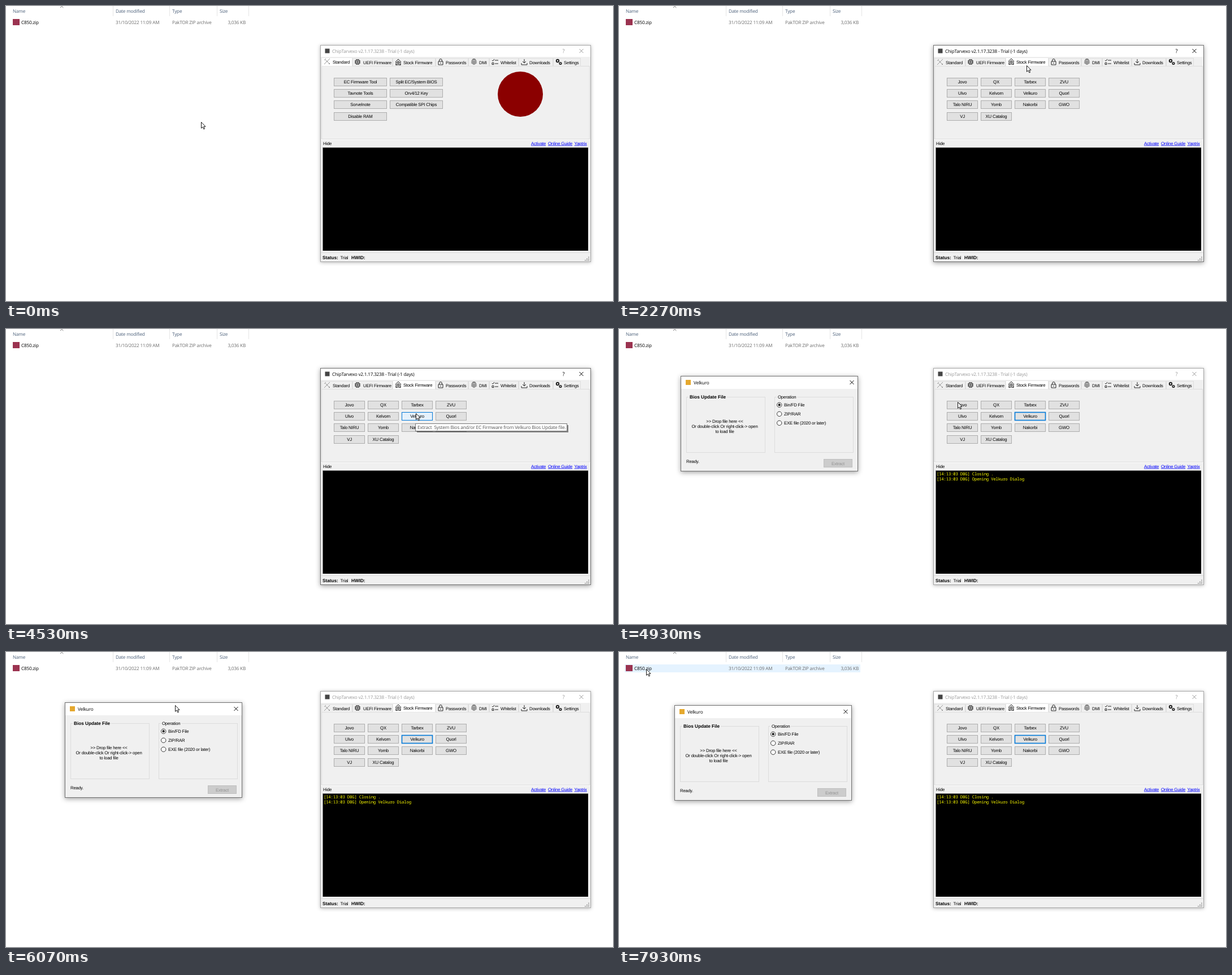
An HTML page that plays this animation: 1074x522 px, repeating every 8 s.

```html
<!DOCTYPE html>
<html lang="en">
<head>
<meta charset="utf-8">
<title>Firmware tool</title>
<style>
html, body { margin: 0; width: 100%; height: 100%; overflow: hidden; background: #fff; }
svg { display: block; width: 1074px; height: 522px; }
text { font: 7.8px "Liberation Sans", Arial, sans-serif; letter-spacing: -.2px; white-space: pre; text-rendering: geometricPrecision; }
.ui { font: 8.2px "Open Sans", "Noto Sans", sans-serif; letter-spacing: -.2px; }
.tip { font-size: 8.4px; }
.bold { font-weight: bold; font-size: 8.2px; letter-spacing: 0; }
.mono { font: 7.4px "Noto Sans Mono", "DejaVu Sans Mono", monospace; letter-spacing: -.25px; }
.link { fill: #00f; text-decoration: underline; }
.icon { fill: none; stroke: #222; }
.btn { fill: #e1e1e1; stroke: #adadad; }
.hot { fill: #e5f1fb; stroke: #0078d7; }
.down { fill: #cce4f7; stroke: #005499; }
.focus { stroke: #0078d7; stroke-width: 1.6px; }
.tab { fill: #f0f0f0; stroke: #dedede; }
.tab.over { fill: #d8eaf9; }
.tab.on { fill: #fff; stroke: #e8e8e8; }
#main { filter: drop-shadow(0 1px 3px rgba(0,0,0,.28)); }
#main.active { filter: drop-shadow(0 2px 4px rgba(0,0,0,.38)); }
#main .frame { fill: #f0f0f0; stroke: #a6a6a6; }
#main.active .frame { stroke: #707070; }
#main .caption { fill: #999; stroke: none; }
#main.active .caption { fill: #000; }
#main .close { stroke: #999; }
#main.active .close { stroke: #000; }
#dialog { filter: drop-shadow(0 2px 4px rgba(0,0,0,.38)); }
</style>
</head>
<body>
<svg id="stage" viewBox="0 0 1074 522"></svg>
<script>
const BRAND = 'Velkuro';
const STEP = 1000 / 15, STEPS = 120;

const attrs = o => Object.entries(o).map(([k, v]) => `${k}="${v}"`).join(' ');
const text = (x, y, s, o = {}) => `<text x="${x}" y="${y}" ${attrs(o)}>${s}</text>`;
const ui = (x, y, s, o = {}) => text(x, y, s, { class: 'ui', ...o });
const mid = (x, y, s, o = {}) => text(x, y, s, { 'text-anchor': 'middle', ...o });
const rect = (x, y, w, h, o = {}) => `<rect x="${x}" y="${y}" width="${w}" height="${h}" ${attrs(o)}/>`;
const path = (d, o = {}) => `<path d="${d}" ${attrs({ fill: 'none', ...o })}/>`;
const cross = (x, y, o = {}) => path(`M${x - 3.5} ${y - 3.5}l7 7m0-7l-7 7`, { stroke: '#000', ...o });
const button = (x, y, w, label, id) =>
  rect(x + .5, y + .5, w - 1, 14, { class: 'btn', ...(id && { id }) }) + mid(x + w / 2, y + 10.4, label);

const rowY = [127, 147, 167, 188];

// Icons are drawn around their own centre.
const icons = [
  '<g stroke="#999"><path d="M-4-4L5 5M5-5L-5 5M-5-2l3-3M3 5l2-2"/></g>',
  '<path d="M-3-3h6v6h-6zM-1-1h2v2h-2zM-2-5v2M0-5v2M2-5v2M-2 3v2M0 3v2M2 3v2M-5-2h2M-5 0h2M-5 2h2M3-2h2M3 0h2M3 2h2"/>',
  '<path d="M-5 0L0-5 5 0M-4 0v5h2M4 0v5h-2M-5 5h10"/><circle cy="1" r="2.3"/><circle cy="1" r=".6"/>',
  '<path d="M-4-1h8v6h-8zM-2.3-1v-2a2.3 2.3 0 0 1 4.6 0v2M0 1v2"/>',
  '<path stroke="#666" d="M-4 3v-4a4 4 0 0 1 8 0v4M-2.4 4v-5a2.4 2.4 0 0 1 4.8 0v5M-.7 5v-6a.7.7 0 0 1 1.4 0v6M-3-4.5q3-2 6 0"/>',
  '<path d="M0-3h6M0 3h6M-5-3l1.5 1.5L-1-5M-5 1.5h3v3h-3z"/>',
  '<path d="M0-5v7M-3-1L0 2 3-1M-5 2v3h10v-3"/>',
  '<circle cx="-2" cy="-2" r="2.2" stroke-width="2"/><circle cx="3" cy="2.5" r="1.8" stroke-width="1.6"/>'
];

const tabs = [
  [558, 568, 578, 'Standard'], [613, 622, 632, 'UEFI Firmware'], [684, 694, 703, 'Stock Firmware'],
  [760, 769, 778, 'Passwords'], [818, 828, 837, 'DMI'], [855, 865, 875, 'Whitelist'],
  [907, 917, 926, 'Downloads'], [968, 978, 987, 'Settings']
];
const tabStrip = tabs.map(([x, iconX, textX, label], i) => {
  const end = i < 7 ? tabs[i + 1][0] : 1017;
  return rect(x + .5, 92.5, end - x - 1, 14, { class: 'tab', id: 'tab' + i }) +
    `<g id="tabBody${i}"><g class="icon" id="icon${i}" transform="translate(${iconX} 99)">${icons[i]}</g>` +
    text(textX, 102.6, label) + '</g>';
}).join('');

const standardPage = [
  ['EC Firmware Tool', 'Tavnote Tools', 'Sorvelnote', 'Disable RAM'],
  ['Split EC/System BIOS', 'Orv4/12 Key', 'Compatible SPI Chips']
].map((col, c) => col.map((s, r) => button(580 + c * 99, rowY[r], 94, s)).join('')).join('') +
  '<circle cx="910" cy="156" r="40" fill="#8b0000"/>';

const stockPage = [
  ['Jovo', 'QX', 'Tarbex', 'ZVU'],
  ['Ulvo', 'Kelvorn', BRAND, 'Quorl'],
  ['Talo NIRU', 'Yomb', 'Nakorbi', 'GWO'],
  ['VJ', 'XU Catalog']
].map((row, r) => row.map((s, c) =>
  button(580 + c * 60, rowY[r], 55, s, s === BRAND && 'brandButton')).join('')).join('');

const explorer =
  rect(10, 22, 417, 14, { id: 'rowHover', fill: '#e5f3ff' }) +
  path('M189.5 0V18M289.5 0V18M373.5 0V18M429.5 0V18', { stroke: '#e5e5e5' }) +
  path('M96 3L98.7.5 101.4 3', { stroke: '#777' }) +
  [[12, 'Name'], [194, 'Date modified'], [294, 'Type'], [378, 'Size']]
    .map(([x, s]) => ui(x, 12, s, { fill: '#4c607a' })).join('') +
  rect(12, 23, 12, 11, { fill: '#9b3350' }) + ui(27, 32, 'C850.zip') +
  ui(194, 32, '31/10/2022 11:09 AM', { fill: '#6d6d6d' }) +
  ui(294, 32, 'PakTOR ZIP archive', { fill: '#6d6d6d' }) +
  ui(424, 32, '3,036 KB', { fill: '#6d6d6d', 'text-anchor': 'end' });

const mainWindow = `<g id="main">` +
  rect(556.5, 69.5, 478, 383, { class: 'frame' }) +
  rect(557, 70, 477, 20, { fill: '#fff' }) +
  rect(564.5, 75.5, 8, 8, { fill: '#444' }) +
  ui(577, 83, 'ChipTarvexo v2.1.17.3238 - Trial (-1 days)', { class: 'ui caption' }) +
  ui(984.5, 83, '?', { class: 'ui caption', style: 'font-size:9.5px' }) +
  cross(1018, 79.5, { class: 'close' }) +
  rect(558.5, 106.5, 474, 129, { fill: '#f0f0f0', stroke: '#dcdcdc' }) + tabStrip +
  `<g id="standardPage">${standardPage}</g><g id="stockPage">${stockPage}</g>` +
  path('M557 236.5H1034', { stroke: '#fff' }) +
  text(561, 245.6, 'Hide') +
  [[929, 'Activate'], [959, 'Online Guide'], [1005.5, 'Yaptrix']]
    .map(([x, s]) => text(x, 245.6, s, { class: 'link' })).join('') +
  rect(561, 251, 469, 182) +
  path('M560.5 433V250.5H1030', { stroke: '#828282' }) +
  path('M560 433.5H1030.5V250', { stroke: '#eee' }) +
  '<g id="log" fill="#ff0">' + text(562, 259.2, '[14:13:03 DBG] Closing .', { class: 'mono' }) +
  text(562, 268.2, `[14:13:03 DBG] Opening ${BRAND} Dialog`, { class: 'mono' }) + '</g>' +
  path('M557 436.5H1034', { stroke: '#dcdcdc' }) +
  text(560, 448, 'Status:', { class: 'bold' }) + text(591.5, 448, 'Trial') + text(611, 448, 'HWID:', { class: 'bold' }) +
  path('M1030 444.5h2M1027 447.5h2m1 0h2M1024 450h2m1 0h2m1 0h2', { stroke: '#999', 'stroke-width': 1.5 }) +
  '</g>';

const group = (x, label, o) => rect(x + .5, 120.5, 139, 98, { fill: 'none', stroke: '#dcdcdc' }) +
  rect(x + 4, 117, o ? 68 : 36, 7, { fill: '#f0f0f0' }) + text(x + 6, 122.7, label, o);

const dialog = `<g id="dialog">` +
  rect(109.5, 83.5, 313, 168, { fill: '#f0f0f0', stroke: '#707070' }) +
  rect(110, 84, 312, 22, { fill: '#fff' }) +
  rect(118, 90, 9, 9, { fill: '#e5a82e' }) + ui(132, 97.6, BRAND) + cross(412, 94.5) +
  group(119, 'Bios Update File', { class: 'bold' }) + group(275, 'Operation') +
  ['&gt;&gt; Drop file here &lt;&lt;', 'Or double-click Or right-click-&gt; open', 'to load file']
    .map((s, i) => mid(187, 166 + i * 9.2, s)).join('') +
  ['Bin/FD File', 'ZIP/RAR', 'EXE file (2020 or later)'].map((s, i) =>
    `<circle cx="283.7" cy="${134.3 + i * 16}" r="4.2" fill="#fff" stroke="#333"/>` + text(292, 137.2 + i * 16, s)).join('') +
  '<circle cx="283.7" cy="134.3" r="2.2" fill="#222"/>' +
  text(119, 237.3, 'Ready.') + rect(362.5, 230.5, 50, 14, { fill: '#ccc', stroke: '#bfbfbf' }) +
  mid(387.5, 240.6, 'Extract', { fill: '#939393' }) + '</g>';

const tooltip = '<g id="tooltip">' + rect(727, 170, 268, 13, { fill: '#000', opacity: .45 }) +
  rect(724.5, 167.5, 268, 13, { fill: '#fff', stroke: '#767676' }) +
  ui(728, 176.8, `Extract  System Bios and/or EC Firmware from ${BRAND} Bios Update file.`,
    { class: 'ui tip', fill: '#575757' }) + '</g>';

const cursor = path('M.5.5V11.3L3 9l1.9 4 1.7-.8L4.8 8.3H8z',
  { id: 'cursor', fill: '#fff', stroke: '#000', 'stroke-width': .9 });
const ring = '<circle id="ring" cx="727" cy="153.5" fill="none" stroke="#999" stroke-width="1.5"/>';

document.getElementById('stage').innerHTML = explorer + mainWindow + dialog + tooltip + ring + cursor;
const $ = id => document.getElementById(id);

// Pointer stops: step, x, y
const stops = [
  [6, 345, 205], [15, 718, 104], [21, 718, 104], [22, 720, 103], [33, 720, 103], [34, 721, 105],
  [36, 721, 105], [41, 725, 154], [54, 725, 154], [55, 727, 155], [57, 727, 155], [58, 726, 153],
  [61, 726, 153], [64, 725, 150], [67, 725, 150], [68, 725, 149], [70, 725, 149], [81, 307, 82],
  [82, 307, 82], [83, 305, 82], [84, 305, 82], [86, 304, 88], [88, 304, 88], [94, 293, 99],
  [100, 74, 45], [101, 55, 35], [103, 34, 28], [104, 35, 30], [109, 168, 31], [114, 168, 31], [119, 48, 30]
];

function pointerAt(step) {
  const i = stops.findIndex(s => s[0] >= step);
  if (i <= 0) return stops[0].slice(1);
  const [t0, x0, y0] = stops[i - 1], [t1, x1, y1] = stops[i];
  const u = (step - t0) / (t1 - t0), e = u * u * (3 - 2 * u);
  return [x0 + (x1 - x0) * e, y0 + (y1 - y0) * e];
}

const show = (id, on) => $(id).style.display = on ? '' : 'none';
const between = (n, a, b) => n >= a && n < b;

function render(step) {
  const [x, y] = pointerAt(step).map(Math.round);
  const selected = step < 20 ? 0 : 2;
  const opened = step >= 72;
  $('cursor').setAttribute('transform', `translate(${x} ${y})`);

  for (const i of [0, 2]) {
    const on = selected === i;
    const over = i === 2 && !on && between(x, 685, 760) && between(y, 92, 107);
    const tab = $('tab' + i);
    tab.setAttribute('class', 'tab' + (on ? ' on' : over ? ' over' : ''));
    tab.setAttribute('y', on ? 91.5 : 92.5);
    tab.setAttribute('height', on ? 15 : 14);
    $('tabBody' + i).setAttribute('transform', `translate(0 ${on ? -1 : 0})`);
  }
  show('icon2', step !== 20);
  show('standardPage', step < 21);
  show('stockPage', step >= 21);
  $('main').setAttribute('class', between(step, 21, 72) ? 'active' : '');

  const overButton = step < 72 && between(x, 700, 755) && between(y, 147, 162);
  $('brandButton').setAttribute('class', 'btn ' +
    (step === 70 ? 'down' : overButton ? 'hot' : step > 70 ? 'focus' : ''));

  show('tooltip', between(step, 49, 70));
  $('tooltip').setAttribute('opacity', Math.min(1, (step - 48) / 5));
  show('ring', between(step, 62, 64));
  $('ring').setAttribute('r', step === 62 ? 69 : 36);

  show('log', opened);
  show('dialog', opened);
  $('dialog').setAttribute('opacity', Math.min(1, (step - 71) / 3));
  const [dragX, dragY] = pointerAt(Math.min(94, Math.max(88, step))).map(Math.round);
  $('dialog').setAttribute('transform', `translate(${dragX - 304} ${dragY - 88})`);
  show('rowHover', step >= 101);
}

function tick() {
  const t = performance.now() % (STEP * STEPS);
  render(Math.min(STEPS - 1, Math.floor((t + 4) / STEP)));
  requestAnimationFrame(tick);
}
tick();
</script>
</body>
</html>
```
